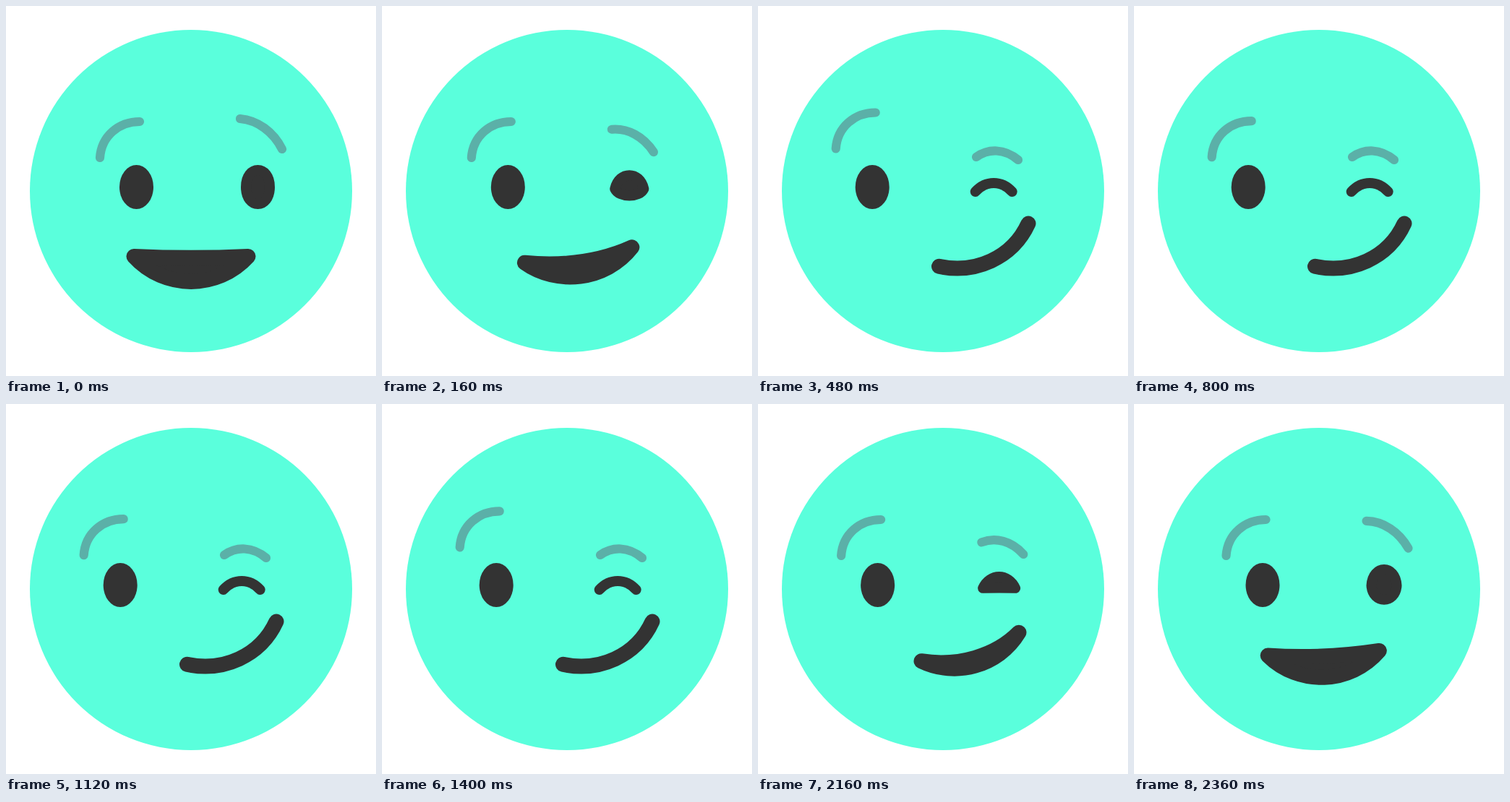
An HTML page that plays this animation: 512x512 px, repeating every 2400 ms.

```html
<!DOCTYPE html>
<html lang="en">
<head>
<meta charset="utf-8">
<title>Winking face</title>
<style>
html, body { margin: 0; width: 100%; height: 100%; overflow: hidden; background: #fff; }
svg { display: block; width: 100vw; height: 100vh; }
.brow { fill: none; stroke: #5bb0a8; stroke-width: 12.2; stroke-linecap: round; }
.dark { fill: #333; }
.round { stroke: #333; stroke-linejoin: round; stroke-linecap: round; }
</style>
</head>
<body>
<svg viewBox="0 0 512 512">
  <circle cx="256" cy="256" r="223" fill="#5affdc"/>
  <path id="browL" class="brow" d="M130 210C132 180 156 160 185 160"/>
  <path id="browR" class="brow"/>
  <ellipse id="eyeL" class="dark" cx="180.5" cy="250.5" rx="23.5" ry="30.5"/>
  <path id="eyeR" class="dark round" stroke-width="14"/>
  <path id="mouth" class="dark round" stroke-width="21"/>
</svg>
<script>
const LOOP = 2400, STEP = 40, WINK = 360, BEAT = 120, WAGGLE_END = 1800, BACK = 2040;
const SHIFT = 22.3, RAISE = 12.5, DIP = 6.5;
const el = id => document.getElementById(id);
const mix = (a, b, p) => a + (b - a) * p;
const mixPoints = (a, b, p) => a.map(([x, y], i) => [mix(x, b[i][0], p), mix(y, b[i][1], p)]);

const browOpen = [[324, 156], [348, 158], [370, 174], [382, 198]];
const browWink = [[302, 209], [319, 197], [341, 197], [360, 213]];

// Centre line of the closed smile, and the two lips of the open one.
const smile = [[250.5, 360.3], [300, 371], [352, 349], [374, 301]];
const upperLip = bow(256, 346.5, 79, 26, 2.5);
const lowerLip = bow(256, 346.5, 79, 37, 46.5);

// Symmetric cubic: ends at cx -+ half, controls at cx -+ inner, lowered by drop.
function bow(cx, y, half, inner, drop) {
  return [[cx - half, y], [cx - inner, y + drop], [cx + inner, y + drop], [cx + half, y]];
}

const cubic = pts => "C" + pts.slice(1).join(" ");
const curve = pts => "M" + pts[0] + cubic(pts);
const lens = (top, bottom) => curve(top) + cubic([...bottom].reverse()) + "Z";

const ease = (x, n) => x < 0.5 ? (2 * x) ** n / 2 : 1 - (2 - 2 * x) ** n / 2;

function winkAt(t, power) {
  if (t < WINK) return ease(t / WINK, power);
  return t < BACK ? 1 : 1 - (t - BACK) / (LOOP - BACK);
}

function raiseAt(t) {
  if (t < WINK || t >= WAGGLE_END) return 0;
  const beats = (t - WINK) / BEAT, n = Math.floor(beats), v = ease(beats - n, 5);
  return n % 2 ? 1 - v : v;
}

function drawEye(p, squint) {
  const cx = 348.5 - SHIFT * p, y = mix(250.5, 257, squint);
  const half = mix(16.5, 25.5, squint), inner = mix(16.5, 11, squint);
  el("eyeR").setAttribute("d", lens(
    bow(cx, y, half, inner, mix(-31.3, -16, squint)),
    bow(cx, y, half, inner, mix(31.3, -16, squint))));
}

function drawMouth(p, dip) {
  const top = mixPoints(upperLip, smile, p), bottom = mixPoints(lowerLip, smile, p);
  top.slice(0, 3).forEach(pt => pt[1] += dip);
  bottom[0] = top[0];
  el("mouth").setAttribute("d", lens(top, bottom));
}

function draw(t) {
  const p = winkAt(t, 5);
  el("eyeL").setAttribute("cx", 180.5 - SHIFT * p);
  el("browL").setAttribute("transform", `translate(${-SHIFT * p} ${-RAISE * raiseAt(t)})`);
  el("browR").setAttribute("d", curve(mixPoints(browOpen, browWink, p)));
  drawEye(p, winkAt(t, 2));
  drawMouth(p, t < WINK ? DIP * Math.sin(Math.PI * p) : 0);
}

const start = performance.now();
function tick() {
  const t = (performance.now() - start) % LOOP;
  draw(Math.floor(t / STEP) * STEP);
  requestAnimationFrame(tick);
}
tick();
</script>
</body>
</html>
```
